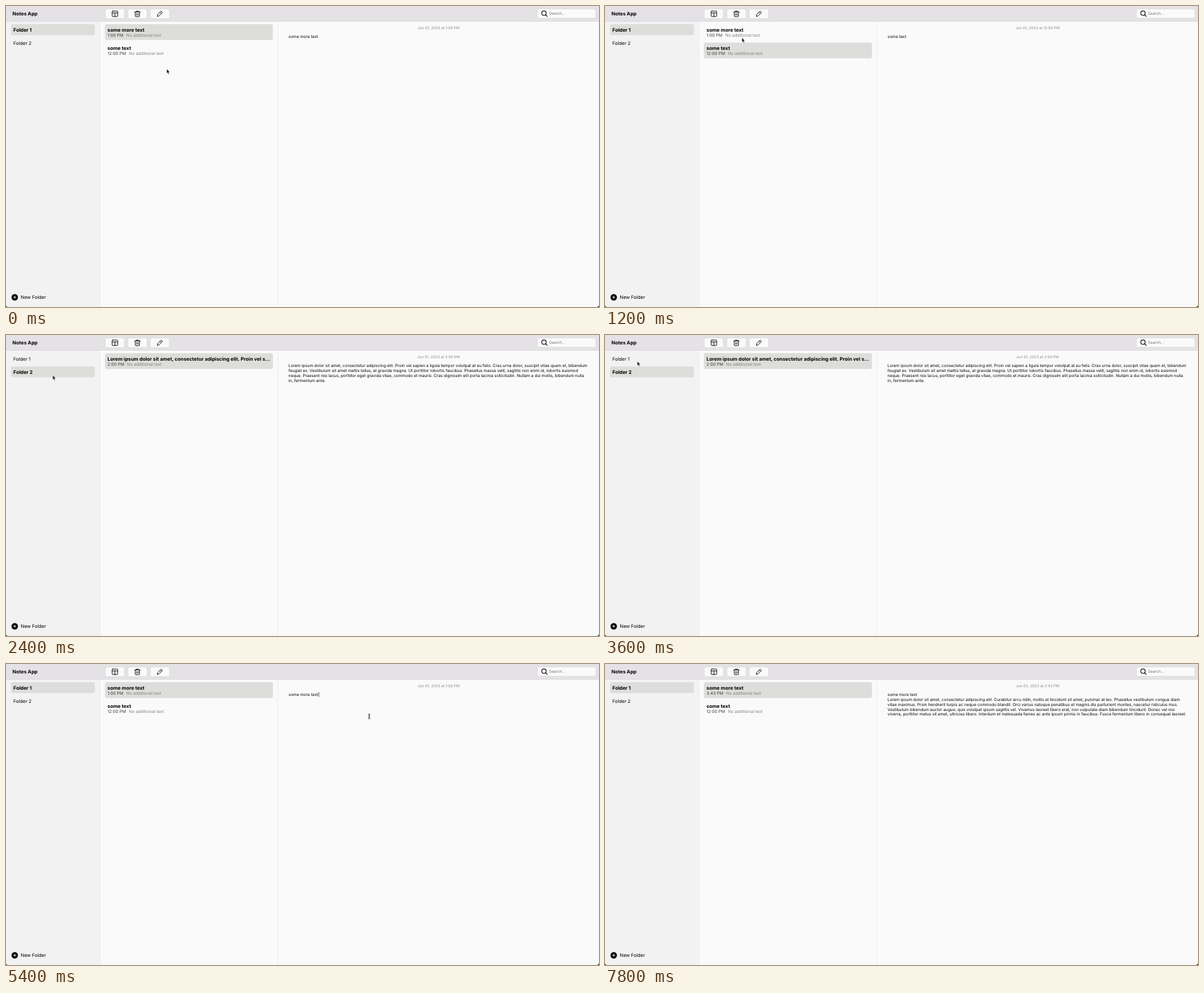
Animation of 944x480 px, one loop 8 s. Source, as an HTML page:

```html
<!DOCTYPE html>
<html lang="en">
<head>
<meta charset="utf-8">
<title>Notes App</title>
<style>
  html, body { margin: 0; width: 100%; height: 100%; overflow: hidden; background: #111; }
  svg { display: block; }
  .app { width: 944px; height: 480px; background: #fafafa; border-radius: 0 0 4px 4px; }

  text { font-family: Inter, "Liberation Sans", sans-serif; text-rendering: geometricPrecision; white-space: pre; fill: #000; }
  .bold { font-size: 7.79px; font-weight: 700; }
  .item { font-size: 7.47px; }
  .meta { font-size: 6.69px; fill: #3c3c3c; }
  .dim { fill: #808080; }
  .body { font-size: 6.43px; }
  .date { font-size: 5.9px; fill: #888; text-anchor: middle; }
  .hint { font-size: 6.2px; fill: #707070; }
  .box { fill: #fafafa; stroke: #d2d0d3; stroke-width: .6; }
  .pick { fill: #dddedb; }
  .icon { fill: none; stroke: #111; stroke-width: 1; stroke-linecap: round; stroke-linejoin: round; }
  .lens { stroke-width: 1.2; }

  /* One loop is 8 s, so 2.5% is a 200 ms step. */
  .step { animation: 8s step-end infinite; }
  .home { animation-name: home; }
  .away { animation-name: away; }
  .row { animation-name: row; }
  .first { animation-name: first; }
  .second { animation-name: second; }
  .before { animation-name: before; }
  .after { animation-name: after; }
  .pasted { animation-name: pasted; }
  .pointer { animation-name: pointer; }
  .arrow { animation-name: arrow; }
  .beam { animation-name: beam; }
  .caret { animation-name: caret; }

  @keyframes home { 0%, 47.5%, 100% { opacity: 1 } 30% { opacity: 0 } }
  @keyframes away { 0%, 47.5%, 100% { opacity: 0 } 30% { opacity: 1 } }
  @keyframes row { 0%, 20%, 100% { transform: none } 7.5% { transform: translateY(29.3px) } }
  @keyframes first { 0%, 20%, 100% { opacity: 1 } 7.5% { opacity: 0 } }
  @keyframes second { 0%, 20%, 100% { opacity: 0 } 7.5% { opacity: 1 } }
  @keyframes before { 0% { opacity: 1 } 85%, 100% { opacity: 0 } }
  @keyframes after { 0% { opacity: 0 } 85%, 100% { opacity: 1 } }
  @keyframes pasted { 0% { opacity: 0 } 82.5%, 100% { opacity: 1 } }
  @keyframes pointer {
    0% { transform: translate(256px, 100.5px) }
    5% { transform: translate(247px, 91px) }
    7.5% { transform: translate(235.3px, 78.4px) }
    12.5% { transform: translate(226px, 64px) }
    15%, 20% { transform: translate(218px, 50.6px) }
    22.5% { transform: translate(196px, 50px) }
    25% { transform: translate(144px, 53px) }
    27.5% { transform: translate(90px, 61px) }
    30% { transform: translate(74.4px, 64.2px) }
    35% { transform: translate(69px, 59px) }
    37.5% { transform: translate(57px, 47px) }
    40% { transform: translate(51.4px, 42.6px) }
    45% { transform: translate(51.4px, 42px) }
    52.5% { transform: translate(66px, 44px) }
    55% { transform: translate(160px, 57px) }
    57.5% { transform: translate(310px, 70px) }
    60% { transform: translate(470px, 78px) }
    62.5% { transform: translate(556px, 82px) }
    65% { transform: translate(577px, 83.8px) }
    67.5%, 100% { transform: translate(578.2px, 83.6px) }
  }
  @keyframes arrow { 0% { opacity: 1 } 60%, 100% { opacity: 0 } }
  @keyframes beam { 0%, 77.5%, 100% { opacity: 0 } 60% { opacity: 1 } }
  @keyframes caret {
    0%, 75%, 97.5%, 100% { opacity: 0; transform: translate(450px, 92.2px) }
    67.5% { opacity: 1; transform: translate(497.4px, 45px) }
    77.5% { opacity: 1; transform: translate(450px, 52.9px) }
    82.5% { opacity: 1; transform: translate(450px, 84.3px) }
    87.5%, 90% { opacity: 1; transform: translate(450px, 92.2px) }
  }
</style>
</head>
<body>
<svg class="app" viewBox="0 0 944 480" width="944" height="480">
  <defs>
    <rect id="button" class="box" y="4.8" width="30.4" height="15.2" rx="2.6"/>
    <rect id="folder" class="pick" x="8" y="29" width="133.4" height="17.4" rx="2.4"/>
    <rect id="note" class="pick" x="157.5" y="29" width="267.4" height="25.2" rx="2.4"/>
  </defs>

  <!-- Panes -->
  <path fill="#f2f2f2" d="M0 25H149.5V480H0z"/>
  <path fill="none" stroke="#e6e6e6" stroke-width=".8" d="M149.7 25V480M432.7 25V480"/>

  <!-- Toolbar -->
  <path fill="#e5e2e6" d="M0 0H944V25H0z"/>
  <path fill="#d6d3d7" d="M0 24.5H944V25.1H0z"/>
  <text class="bold" x="10.3" y="15.3">Notes App</text>
  <use href="#button" x="158"/>
  <use href="#button" x="194"/>
  <use href="#button" x="229.8"/>
  <g class="icon">
    <rect x="169" y="8" width="8.8" height="8.8" rx="1"/>
    <path d="M169 11H177.8M173.4 11V16.8"/>
    <path d="M204.8 9.5H213.6M207.4 9.3V8.1H211V9.3M205.8 9.7V16A1 1 0 0 0 206.8 17H211.6A1 1 0 0 0 212.6 16V9.7M208.1 11.8V14.8M210.3 11.8V14.8"/>
    <path d="M241 16.3L241.5 13.6L246.6 8.5Q247.2 8 247.8 8.6L248.7 9.5Q249.3 10.1 248.7 10.7L243.7 15.7ZM245.5 9.8L247.5 11.8"/>
  </g>
  <rect class="box" x="846" y="4.8" width="93" height="14.8" rx="2.6"/>
  <g class="icon lens">
    <circle cx="856.4" cy="11.4" r="3.5"/>
    <path d="M859 14L861.6 16.6"/>
  </g>
  <text class="hint" x="864.3" y="14.3">Search...</text>

  <!-- New folder -->
  <circle cx="13.9" cy="464.5" r="5.2" fill="#111"/>
  <path stroke="#fff" stroke-width=".9" d="M11.9 464.5H15.9M13.9 462.5V466.5"/>
  <text class="item" x="23.5" y="467.3">New Folder</text>

  <!-- First folder -->
  <g class="step home">
    <use href="#folder"/>
    <text class="bold" x="11.8" y="40.6">Folder 1</text>
    <text class="item" x="11.8" y="61.6">Folder 2</text>

    <use class="step row" href="#note"/>
    <text class="bold" x="161.6" y="40.6">some more text</text>
    <text class="meta step before" x="161.6" y="49">1:00 PM<tspan class="dim" x="191.6">No additional text</tspan></text>
    <text class="meta step after" x="161.6" y="49">3:43 PM<tspan class="dim" x="192.8">No additional text</tspan></text>
    <text class="bold" x="161.6" y="69.9">some text</text>
    <text class="meta" x="161.6" y="78.3">12:00 PM<tspan class="dim" x="195.7">No additional text</tspan></text>

    <g class="step first">
      <text class="date step before" x="688.6" y="36.7">Jun 01, 2023 at 1:00 PM</text>
      <text class="date step after" x="688.6" y="36.7">Jun 05, 2023 at 3:43 PM</text>
      <text class="body" x="449.8" y="51">some more text</text>
      <text class="body step pasted" y="51">
        <tspan x="449.8" dy="7.87">Lorem ipsum dolor sit amet, consectetur adipiscing elit. Curabitur arcu nibh, mollis at tincidunt sit amet, pulvinar at leo. Phasellus vestibulum congue diam</tspan>
        <tspan x="449.8" dy="7.87">vitae maximus. Proin hendrerit turpis ac neque commodo blandit. Orci varius natoque penatibus et magnis dis parturient montes, nascetur ridiculus mus.</tspan>
        <tspan x="449.8" dy="7.87">Vestibulum bibendum auctor augue, quis volutpat ipsum sagittis vel. Vivamus laoreet libero erat, non vulputate diam bibendum tincidunt. Donec vel nisi</tspan>
        <tspan x="449.8" dy="7.87">viverra, porttitor metus sit amet, ultricies libero. Interdum et malesuada fames ac ante ipsum primis in faucibus. Fusce fermentum libero in consequat laoreet.</tspan>
      </text>
    </g>
    <g class="step second">
      <text class="date" x="688.6" y="36.7">Jun 01, 2023 at 12:00 PM</text>
      <text class="body" x="449.8" y="51">some text</text>
    </g>
  </g>

  <!-- Second folder -->
  <g class="step away">
    <use href="#folder" y="21.2"/>
    <text class="item" x="11.8" y="40.6">Folder 1</text>
    <text class="bold" x="11.8" y="61.6">Folder 2</text>

    <use href="#note"/>
    <text class="bold" x="161.6" y="40.6">Lorem ipsum dolor sit amet, consectetur adipiscing elit. Proin vel s…</text>
    <text class="meta" x="161.6" y="49">2:00 PM<tspan class="dim" x="192.6">No additional text</tspan></text>

    <text class="date" x="688.6" y="36.7">Jun 01, 2023 at 2:00 PM</text>
    <text class="body" y="43.13">
      <tspan x="449.8" dy="7.87">Lorem ipsum dolor sit amet, consectetur adipiscing elit. Proin vel sapien a ligula tempor volutpat at eu felis. Cras urna dolor, suscipit vitae quam et, bibendum</tspan>
      <tspan x="449.8" dy="7.87">feugiat ex. Vestibulum sit amet mattis tellus, at gravida magna. Ut porttitor lobortis faucibus. Phasellus massa velit, sagittis non enim id, lobortis euismod</tspan>
      <tspan x="449.8" dy="7.87">neque. Praesent nisi lacus, porttitor eget gravida vitae, commodo et mauris. Cras dignissim elit porta lacinia sollicitudin. Nullam a dui mollis, bibendum nulla</tspan>
      <tspan x="449.8" dy="7.87">in, fermentum ante.</tspan>
    </text>
  </g>

  <rect class="step caret" width=".7" height="7.4" fill="#111"/>

  <g class="step pointer">
    <path class="step arrow" fill="#000" stroke="#fff" stroke-width=".5" stroke-linejoin="round"
      d="M0 0V6.9L1.5 5.5L2.7 8.3L3.9 7.8L2.7 5.1H4.7Z"/>
    <path class="step beam" fill="none" stroke="#111" stroke-width=".8"
      d="M-1.8 -3.7Q0 -3.7 0 -2.6V2.6Q0 3.7 -1.8 3.7M1.8 -3.7Q0 -3.7 0 -2.6V2.6Q0 3.7 1.8 3.7"/>
  </g>
</svg>
</body>
</html>
```
